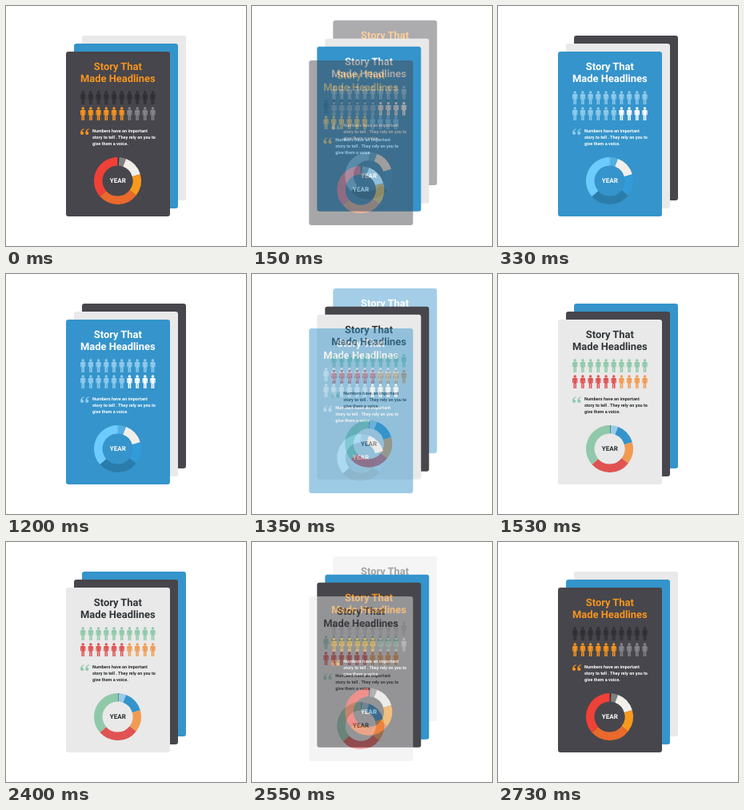
An HTML page for the animation above (3.6 s loop, 300x300 px).

```html
<!DOCTYPE html>
<html lang="en">
<head>
<meta charset="utf-8">
<title>Card stack</title>
<style>
html, body { margin: 0; width: 100%; height: 100%; overflow: hidden; background: #fff; }
svg { display: block; width: 100vw; height: 100vh; }
text { font-family: Roboto, Arial, sans-serif; font-weight: 700; text-rendering: geometricPrecision; }
</style>
</head>
<body>
<svg id="stage" viewBox="0 0 300 300">
  <defs id="defs">
    <g id="person">
      <circle cy="1.9" r="1.75"/>
      <path d="M-3.2 5.4Q-3.2 4.1-1.9 4.1H1.9Q3.2 4.1 3.2 5.4V10.3H2.1V6.4H1.8V17H.3V11H-.3V17H-1.8V6.4H-2.1V10.3H-3.2Z"/>
    </g>
    <path id="mark" d="M4.4 0C1.6 .7 0 2.8 0 5.6A2.1 2.1 0 1 0 2.1 3.6C2.2 2.3 3 1.5 4.7 1Z"/>
  </defs>
</svg>
<script>
const SEGMENT = 1200, STEP = 30, STEPS = 12;
const ANGLES = [0, 4, 21, 74, 128, 228.5, 360];

// In the order in which they come to the front.
const themes = [
  { card: '#47464c', title: '#f7941e', text: '#fff', quote: '#f7941e',
    people: ['#2f2e33', '#f7941e', '#84848a'],
    ring: ['#323136', '#7f7f83', '#f2efeb', '#f8991d', '#ea692c', '#ef4137'] },
  { card: '#3594cb', title: '#fff', text: '#fff', quote: '#8fcbed',
    people: ['#8fcbed', '#8fcbed', '#fff'],
    ring: ['#62bdec', '#50aee2', '#f2efeb', '#329cda', '#2a7dab', '#6dcbff'] },
  { card: '#e9e9e9', title: '#2f3538', text: '#25292b', quote: '#90c9aa',
    people: ['#90c9aa', '#e05352', '#f19b52'],
    ring: ['#4c8f89', '#9ccbe8', '#3594cb', '#f19b52', '#e05352', '#90c9aa'] }
];

const label = (x, y, size, fill, str, anchor = 'middle') =>
  `<text x="${x}" y="${y}" font-size="${size}" fill="${fill}" text-anchor="${anchor}">${str}</text>`;

function crowd(colors) {
  let out = '';
  for (let i = 0; i < 20; i++) {
    const color = i < 10 ? colors[0] : i < 16 ? colors[1] : colors[2];
    const x = 21.2 + (i % 10) * 9.7, y = i < 10 ? 49 : 69;
    out += `<use href="#person" x="${x}" y="${y}" fill="${color}"/>`;
  }
  return out;
}

function ring(colors) {
  const cx = 64.5, cy = 161.5, r = 24.3;
  const at = deg => {
    const a = deg * Math.PI / 180;
    return `${cx + r * Math.sin(a)} ${cy - r * Math.cos(a)}`;
  };
  return colors.map((color, i) =>
    `<path d="M${at(ANGLES[i])}A${r} ${r} 0 0 1 ${at(ANGLES[i + 1])}" fill="none" stroke="${color}" stroke-width="10.4"/>`
  ).join('');
}

function cardMarkup(t, i) {
  const lines = ['Numbers have an important', 'story to tell . They rely on you to', 'give them a voice.'];
  return `<g id="card${i}">
    <rect width="130" height="206" rx="3" fill="${t.card}"/>
    ${label(64.8, 23.2, 12.9, t.title, 'Story That')}
    ${label(64.8, 38.2, 12.9, t.title, 'Made Headlines')}
    ${crowd(t.people)}
    <use href="#mark" x="18" y="96.3" fill="${t.quote}"/>
    <use href="#mark" x="24.2" y="96.3" fill="${t.quote}"/>
    ${lines.map((s, n) => label(33, 100.5 + n * 8, 5.5, t.text, s, 'start')).join('')}
    ${ring(t.ring)}
    ${label(64.8, 164.3, 8, t.text, 'YEAR')}
  </g>`;
}

const stage = document.getElementById('stage');
document.getElementById('defs').insertAdjacentHTML('beforeend', themes.map(cardMarkup).join(''));

// Back to front: entering, third, second, leaving.
const layers = [0, 1, 2, 3].map(() =>
  stage.appendChild(document.createElementNS('http://www.w3.org/2000/svg', 'use')));

function place(layer, theme, x, y, alpha = 1) {
  layer.setAttribute('href', '#card' + theme % 3);
  layer.setAttribute('transform', `translate(${x} ${y})`);
  layer.setAttribute('opacity', alpha);
}

function draw(ms) {
  const time = ms % (SEGMENT * 3);
  const front = Math.floor(time / SEGMENT);
  const k = Math.min(STEPS - 1, Math.floor(time % SEGMENT / STEP));
  const u = k === STEPS - 1 ? 1 : k / STEPS;
  const p = (1 - Math.cos(Math.PI * u)) / 2;
  const slide = 10 * p, drop = 30 * p;

  // At the start of a turn the leaving card still rests in front.
  place(layers[0], front, 105 - slide, 7 + drop, Math.min(1, u * 1.07));
  place(layers[1], front + 2, 95 - slide, 37 + slide);
  place(layers[2], front + 1, 85 - slide, 47 + slide);
  place(layers[3], front, 75 - slide, 57 + drop, Math.max(0, 1 - u / 0.8));
}

const start = performance.now();
function tick() {
  draw(performance.now() - start);
  requestAnimationFrame(tick);
}
tick();
</script>
</body>
</html>
```
